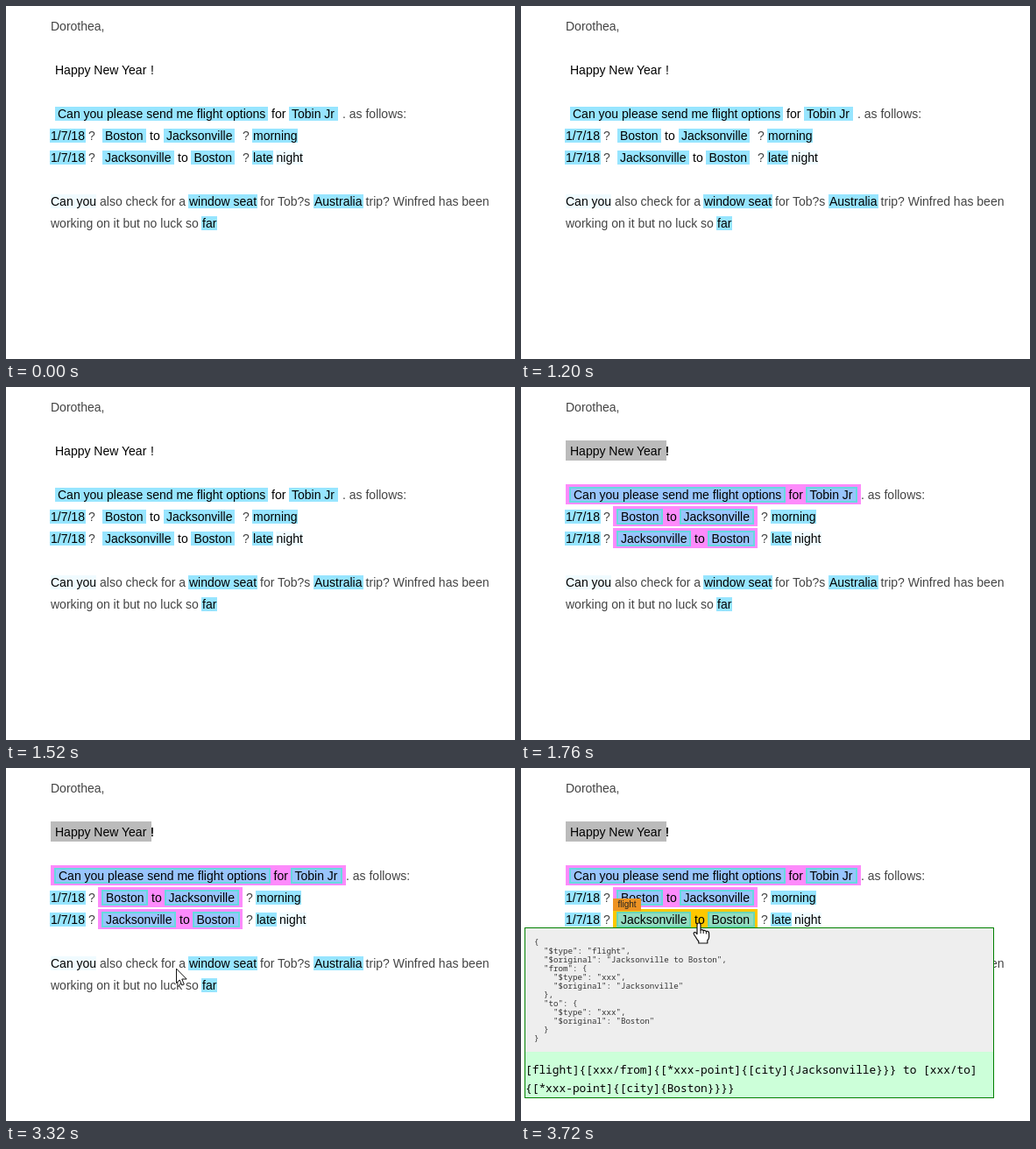
Animation of 581 by 403 pixels, one loop 8 s. Source, as an HTML page:

```html
<!DOCTYPE html>
<html lang="en">
<head>
<meta charset="utf-8">
<title>Flight request</title>
<style>
  html, body { margin: 0; width: 100%; height: 100%; overflow: hidden; background: #fff; }
  svg { display: block; position: absolute; left: 0; top: 0; }
  text { font: 14px "Liberation Sans", Arial, sans-serif; fill: #444; white-space: pre; }
  text.on { fill: #000; }
  text.tip { font-size: 10px; fill: #222; }
  text.json { font: 9.17px "Noto Sans Mono", "DejaVu Sans Mono", monospace; fill: #333; }
  text.code { font: 12.83px "Noto Sans Mono", "DejaVu Sans Mono", monospace; fill: #000; }
</style>
</head>
<body>
<svg id="stage" width="581" height="403" viewBox="0 0 581 403"></svg>
<script>
const LOOP = 8000, ENTER = 2880, ARRIVE = 3640, POPUP = 3720;
const CYAN = '#97e5ff', PALE = '#f0fbff';
const PINK = { box: '#fd8bfb', fill: '#98c4fd', edge: '#66d9e0' };
const GOLD = { box: '#ffc800', fill: '#93dcc0', edge: '#6ad6b4' };

const stage = document.getElementById('stage');
const esc = s => s.replace(/&/g, '&amp;').replace(/</g, '&lt;');
const text = (x, y, s, cls = '') => `<text x="${x}" y="${y}" class="${cls}">${esc(s)}</text>`;
const dark = (x, y, s) => text(x, y, s, 'on');
const rect = (x, y, w, h, fill, extra = '') =>
  `<rect x="${x}" y="${y}" width="${w}" height="${h}" fill="${fill}" ${extra}/>`;

// Highlighted text; y is the baseline
const mark = (left, right, x, y, s, fill = CYAN) =>
  rect(left, y - 13, right - left, 16, fill) + dark(x, y, s);

// Bordered chip inside a phrase box
const chip = (left, right, x, y, s, c) =>
  rect(left + 1, y - 13, right - left - 2, 16, c.fill, `stroke="${c.edge}" stroke-width="2"`) + dark(x, y, s);

const box = (left, right, y, fill) => rect(left, y - 17, right - left, 23, fill);

function group(markup) {
  const g = document.createElementNS('http://www.w3.org/2000/svg', 'g');
  g.innerHTML = markup;
  stage.append(g);
  return g;
}
const show = (g, on) => g.setAttribute('visibility', on ? 'visible' : 'hidden');

group(
  text(51, 28, 'Dorothea,') +
  dark(165, 78, '!') +
  mark(50, 91, 51, 153, '1/7/18') + text(94, 153, '?') +
  mark(50, 91, 51, 178, '1/7/18') + text(94, 178, '?') +
  mark(51, 103, 51, 228, 'Can you', PALE) +
  text(107, 228, 'also check for a') +
  mark(208, 287, 209, 228, 'window seat') +
  text(290, 228, 'for Tob?s') +
  mark(351, 408, 352, 228, 'Australia') +
  text(410.6, 228, 'trip? Winfred has been') +
  text(51, 253, 'working on it but no luck so') +
  mark(223, 241, 224, 253, 'far')
);

const plain = group(
  dark(56, 78, 'Happy New Year') +
  mark(56, 299, 59, 128, 'Can you please send me flight options') +
  dark(303, 128, 'for') +
  mark(323, 379, 326, 128, 'Tobin Jr') +
  text(384, 128, '. as follows:') +
  mark(110, 160, 113, 153, 'Boston') + dark(164, 153, 'to') +
  mark(180, 261, 183, 153, 'Jacksonville') + text(270, 153, '?') +
  mark(281, 333, 282, 153, 'morning') +
  mark(110, 192, 113, 178, 'Jacksonville') + dark(196, 178, 'to') +
  mark(211, 261, 214.5, 178, 'Boston') + text(270, 178, '?') +
  mark(281, 305, 282, 178, 'late') +
  mark(308, 339, 308.5, 178, 'night', PALE)
);

const returnLeg = c =>
  box(105, 270, 178, c.box) +
  chip(109, 194, 114, 178, 'Jacksonville', c) + dark(198, 178, 'to') +
  chip(213, 267, 217.5, 178, 'Boston', c);

const tagged = group(
  box(51, 166, 78, '#bbb') + dark(56, 78, 'Happy New Year') + dark(165, 78, '!') +
  box(51, 388, 128, PINK.box) +
  chip(55, 302, 60, 128, 'Can you please send me flight options', PINK) +
  dark(305.5, 128, 'for') +
  chip(325, 384, 329.5, 128, 'Tobin Jr', PINK) +
  text(388, 128, '. as follows:') +
  box(105, 270, 153, PINK.box) +
  chip(109, 162, 114, 153, 'Boston', PINK) + dark(166, 153, 'to') +
  chip(181, 266, 185.5, 153, 'Jacksonville', PINK) + text(274, 153, '?') +
  mark(285, 337, 286, 153, 'morning') +
  returnLeg(PINK) + text(274, 178, '?') +
  mark(285, 309, 286, 178, 'late') +
  mark(312, 343, 312, 178, 'night', PALE)
);

const hover = group(
  returnLeg(GOLD) + rect(105, 149, 32, 14, '#ee9322') + text(110.5, 159, 'flight', 'tip')
);

const json = JSON.stringify({
  $type: 'flight',
  $original: 'Jacksonville to Boston',
  from: { $type: 'xxx', $original: 'Jacksonville' },
  to: { $type: 'xxx', $original: 'Boston' }
}, null, 2).split('\n');

const popup = group(
  rect(4, 182, 536, 195, '#008000') +
  rect(5, 183, 534, 141, '#eee') +
  rect(5, 324, 534, 52, '#ccffd9') +
  json.map((line, i) => text(15, 202 + i * 10, line, 'json')).join('') +
  text(5, 349, '[flight]{[xxx/from]{[*xxx-point]{[city]{Jacksonville}}} to [xxx/to]', 'code') +
  text(5, 370, '{[*xxx-point]{[city]{Boston}}}}', 'code')
);

const ink = 'fill="#fff" stroke="#111" stroke-linejoin="round" stroke-linecap="round"';
const arrow = group(`<path ${ink} d="M.5.5V16.5L4.2 13 6.8 19 9.3 18 6.8 12H11.8Z"/>`);
// Drawn relative to the fingertip
const hand = group(`<path ${ink} stroke-width="1.2" d="M-2 2Q-2 0 0 0T2 2V8Q3.8 6.8 5.2 8.6
  Q7 7.6 8.4 9.6Q11.6 8.8 11.6 12V16Q11.6 18 9.8 20V23H-.2V21Q-2 19-3.6 16L-5.6 13
  Q-6.4 11.4-5 10.6Q-3.6 10-2 12.6Z"/><path fill="none" stroke="#111" d="M2 8V12M5.2 8.8V12M8.4 9.8V12.4"/>`);

const isTagged = t => t >= 1760 || (t >= 1080 && t < 1200) || (t >= 1400 && t < 1520);

function cursorAt(t) {
  const step = Math.max(0, Math.min(10, Math.floor((t - ENTER) / (ARRIVE - ENTER) * 10)));
  const e = 1 - (1 - step / 10) ** 2;
  return [166 + 37 * e, 386 - 209 * e];
}

function draw(t) {
  const tags = isTagged(t), [x, y] = cursorAt(t);
  const moving = t >= ENTER, over = moving && y < 184;
  show(plain, !tags);
  show(tagged, tags);
  show(hover, over);
  show(popup, t >= POPUP);
  show(arrow, moving && !over);
  show(hand, over);
  for (const g of [arrow, hand]) g.setAttribute('transform', `translate(${Math.round(x)} ${Math.round(y)})`);
}

const start = performance.now();
function tick() {
  draw((performance.now() - start) % LOOP);
  requestAnimationFrame(tick);
}
tick();
</script>
</body>
</html>
```
